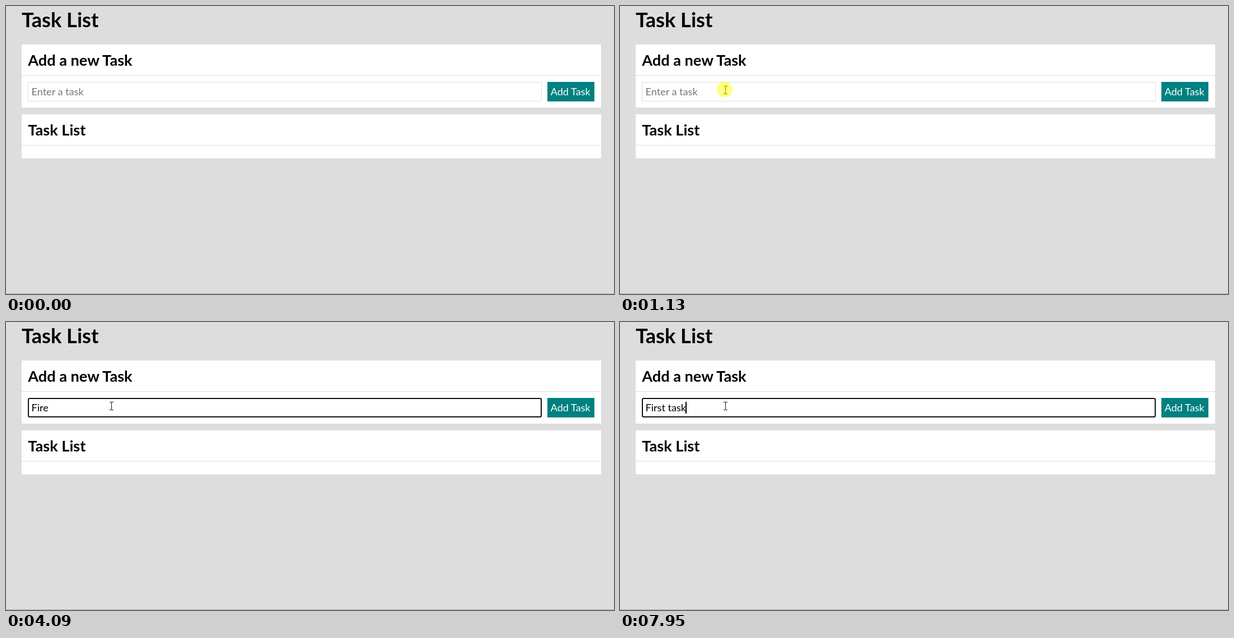
An HTML page for the animation above (8 s loop, 1086 by 516 pixels).

```html
<!DOCTYPE html>
<html lang="en">
<head>
<meta charset="utf-8">
<title>Task List</title>
<style>
  html, body { margin: 0; width: 100%; height: 100%; overflow: hidden; background: #ddd; }
  #stage { position: relative; width: 1086px; height: 516px; overflow: hidden;
    font: 18.1px/22px Lato, sans-serif; color: #000; }
  #stage * { position: absolute; box-sizing: border-box; margin: 0; white-space: pre; }
  h1 { left: 28px; top: 2px; font: bold 36.2px/44px Lato, sans-serif; }
  h2 { left: 11.2px; top: 11px; font: bold 27.15px/33px Lato, sans-serif; }
  .card { left: 28px; width: 1035px; background: #fff; }
  .card hr { left: 0; top: 55px; width: 100%; height: 1px; border: 0; background: #ddd; }
  #field { left: 39px; top: 136px; width: 918px; height: 35px; border: 1px solid #ddd; }
  #field.focus { border: 2px solid #101010; border-radius: 3px; }
  #value { left: 45.5px; top: 142px; }
  #value.hint { color: #757575; }
  #caret { top: 143px; width: 2px; height: 21px; background: #000; }
  #button { left: 967px; top: 136px; width: 84px; height: 35px; background: #008080; }
  #button span { left: 5.7px; top: 6px; color: #fff; }
  #edge { left: 0; top: 515px; width: 100%; height: 1px; background: #a9a9a9; }
  #stage svg { left: 0; top: 0; }
  #stage svg * { position: static; }
</style>
</head>
<body>
<div id="stage">
  <h1>Task List</h1>
  <div class="card" style="top:69px;height:113px"><h2>Add a new Task</h2><hr></div>
  <div class="card" style="top:194px;height:79px"><h2>Task List</h2><hr></div>
  <div id="field"></div>
  <span id="value"></span>
  <div id="caret"></div>
  <div id="button"><span>Add Task</span></div>
  <div id="edge"></div>
  <svg width="1086" height="516">
    <path id="arrow" d="M.5 .5V14.5L3.8 11.4L6.1 16.7L8.3 15.7L6 10.5H10.2Z" fill="#fff" stroke="#000"/>
    <path id="beam" d="M-3.5 -7H-1L0 -6.2L1 -7H3.5M0 -6.5V6.5M-3.5 7H-1L0 6.2L1 7H3.5" fill="none" stroke="#222" stroke-width="1.1"/>
    <circle id="click" cx="187" cy="149.5" r="14" fill="#ff0" opacity=".5"/>
  </svg>
</div>
<script>
  const LOOP = 8000, ENTER = 110, STEP = 67.3, CLICK = 1130, FOCUS = 1210;
  const HINT = 'Enter a task';
  const $ = id => document.getElementById(id);
  const [field, value, caret, arrow, beam, click] =
    ['field', 'value', 'caret', 'arrow', 'beam', 'click'].map($);

  // Pointer position at each step after it enters
  const path = [
    [975, 468], [845, 405], [705, 336], [573, 272], [461, 217],
    [373, 174], [303, 139], [252, 117], [215, 96], [206, 112],
    [202, 128], [200, 140], [194, 145], [189, 149], [188.5, 150.5]
  ];

  // Time, typed text, caret visible
  const typing = [
    [0, '', 0], [FOCUS, '', 1], [1660, '', 0], [2190, '', 1], [2720, '', 0],
    [2990, 'F', 1], [3220, 'Fi', 1], [3420, 'Fir', 1], [3560, 'Fire', 1],
    [4090, 'Fire', 0], [4160, 'Fir', 1], [4620, 'Fir', 0], [5150, 'Fir', 1],
    [5220, 'Firs', 1], [5420, 'First', 1], [5620, 'First ', 1], [6150, 'First ', 0],
    [6420, 'First t', 1], [6550, 'First ta', 1], [6690, 'First tas', 1],
    [6890, 'First task', 1], [7420, 'First task', 0], [7950, 'First task', 1]
  ];

  const show = (el, on) => { el.style.visibility = on ? 'visible' : 'hidden'; };
  const inside = (x, y, l, t, r, b) => x >= l && x < r && y >= t && y < b;

  function drawPointer(t) {
    const k = Math.floor((t - ENTER + 4) / STEP);
    const [x, y] = path[Math.max(0, Math.min(k, path.length - 1))];
    const overText = inside(x, y, 39, 136, 957, 171) || inside(x, y, 39, 84, 227, 113);
    const here = `translate(${x} ${y})`;
    arrow.setAttribute('transform', here);
    beam.setAttribute('transform', here);
    show(arrow, t >= ENTER && !overText);
    show(beam, t >= ENTER && overText);
    show(click, t >= CLICK && t < FOCUS);
  }

  function drawField(t) {
    const [, text, on] = typing.findLast(s => s[0] <= t);
    const content = text || HINT;
    field.className = t >= FOCUS ? 'focus' : '';
    value.className = text ? '' : 'hint';
    if (value.textContent !== content) value.textContent = content;
    const width = text ? value.getBoundingClientRect().width : 0;
    caret.style.left = Math.floor(45.3 + width) + 'px';
    show(caret, on);
  }

  function frame() {
    const t = performance.now() % LOOP;
    drawPointer(t);
    drawField(t);
    requestAnimationFrame(frame);
  }
  frame();
</script>
</body>
</html>
```
